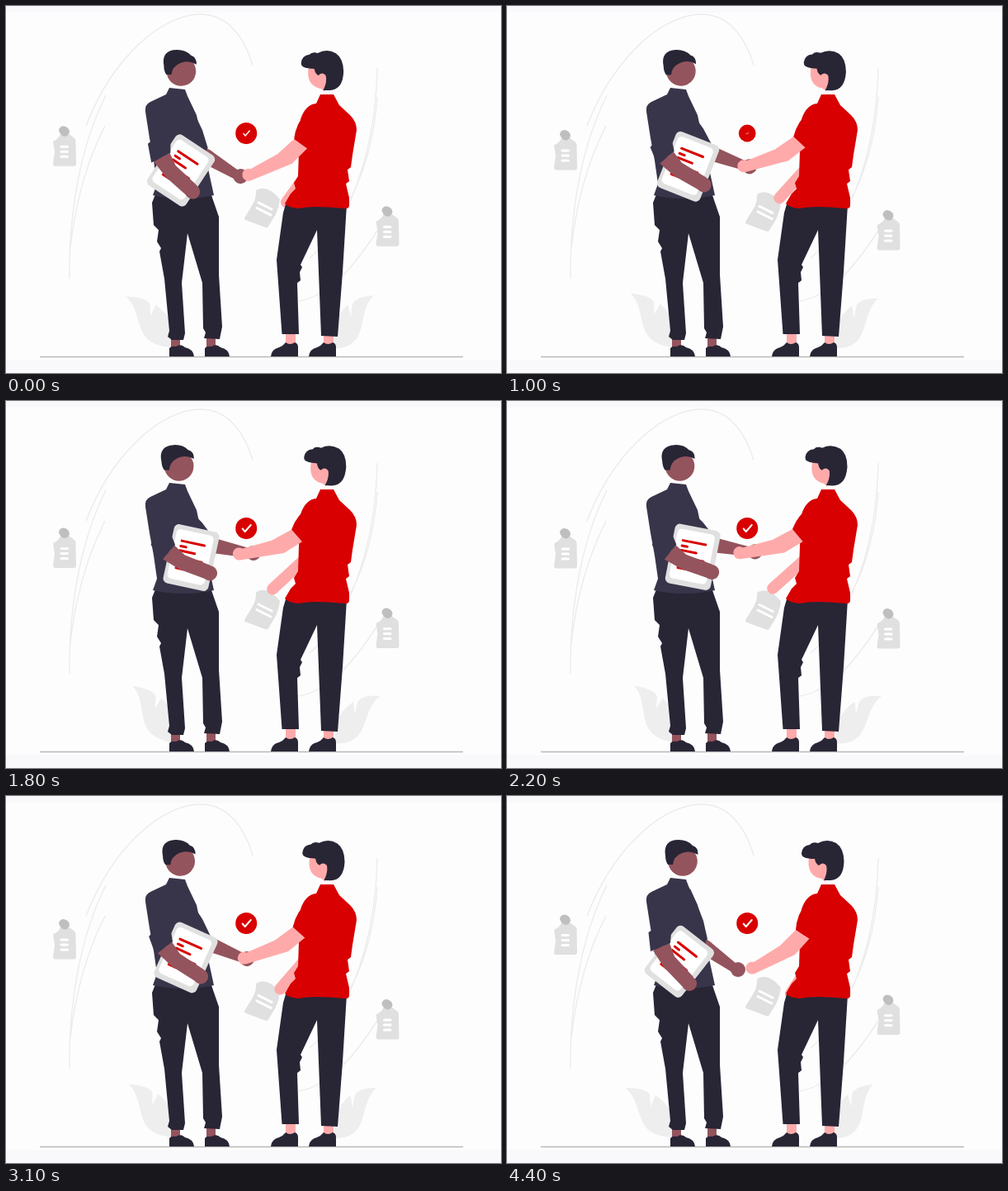
Recreate the animation shown at these times as an HTML page. Size 600 by 444 pixels, loop 4500 ms.

```html
<!DOCTYPE html>
<html lang="en">
<head>
<meta charset="utf-8">
<title>Handshake</title>
<style>
  html, body { margin: 0; width: 100%; height: 100%; overflow: hidden; background: #fdfdfd; }
  svg { display: block; width: 100%; height: 100%; }
  .arc { fill: none; stroke: #ececec; stroke-width: 1.4; }
  .leaf { fill: #eee; }
  .card { fill: #e0e0e0; }
  .pin { fill: #bfbfbf; }
  .dark { fill: #282535; }
  .shirt { fill: #38354a; }
  .red { fill: #d80000; }
  .pink { fill: #ffaaaa; }
  .brown { fill: #94545d; }
  .line { fill: none; stroke: #fff; stroke-width: 3; stroke-linecap: round; stroke-linejoin: round; }
  .notes { stroke: #d80000; }

  /* --p is the sway from 0 to 1 */
  .float { transform: translateY(calc(var(--p) * 10.5px)); }
  .turn { transform: rotate(calc(var(--p) * var(--deg))); }
  #badge { transform: scale(var(--badge)); }
  #tick { transform: scale(var(--tick)); stroke-width: 2; }
  #leafL { --deg: 9.5deg; transform-origin: 200px 414px; }
  #leafR { --deg: 9.5deg; transform-origin: 400px 414px; }
  #headL { --deg: -2.8deg; transform-origin: 209px 150px; }
  #headR { --deg: 3deg; transform-origin: 385px 155px; }
  #holdL { --deg: -27deg; transform-origin: 193px 160.5px; }
  #reachL { --deg: -25deg; transform-origin: 228px 150px; }
  #reachR { --deg: 17deg; transform-origin: 371px 145px; }
  #rearR { --deg: 15deg; transform-origin: 380px 150px; }
</style>
</head>
<body>
<svg viewBox="0 0 600 444">
  <defs>
    <g id="tag">
      <path class="card" d="M57 162Q65 158 66 153H76L83 158Q85 160 84.500 164L85 189Q85 192 82 192H60Q57 192 57 189L59 175Z"/>
      <path class="pin" d="M64 149Q64.500 143.500 70 143.500Q77 145 77 151Q75 156 71 156Q66 155 64 149Z"/>
      <path class="line" d="M67 168.500h7.500m-7.500 6h7.500m-7.500 6h7.500"/>
    </g>
    <path id="shoe" d="M198 424V414Q200 411 206 412Q212 408 217 413Q227 415 228 424Z"/>
    <path id="boot" d="M321 424Q322 415 331 413Q336 411 339 407Q344 411 350 407Q354 408 354 413V424Z"/>
  </defs>

  <path fill="#f9f9fb" d="M0 0h600v8H0zM0 428h600v16H0z"/>
  <path class="arc" d="M97 145C130 60 190 10 236 10C270 10 290 40 299 72M77 330C76 250 90 170 121 108M78 292C84 240 97 190 120 145M450 75C448 170 420 260 368 305M450 110C446 165 432 205 418 232M450 272C425 310 395 350 355 357"/>

  <path id="leafL" class="leaf turn" d="M143 353Q168 353 173 361L174 376L180 362Q195 372 203 390L200 413Q176 412 167 399C157 383 158 364 143 353Z"/>
  <path id="leafR" class="leaf turn" d="M444 349Q420 351 418 362L417 376L413 361Q402 370 396 390L398 414Q416 414 425 401C434 386 430 362 444 349Z"/>

  <g class="float"><use href="#tag"/><use href="#tag" x="391.500" y="97"/></g>
  <path stroke="#b9b9b9" stroke-width="1.500" d="M41 424.500H554"/>

  <g transform="translate(291.200 154)">
    <g id="badge">
      <circle class="red" r="13"/>
      <path id="tick" class="line" d="M-4.500 .5L-1.500 4L5.500 -4"/>
    </g>
  </g>

  <!-- left figure -->
  <g id="reachL" class="turn">
    <path class="brown" d="M236 170L246 176L277 202L276 215L238 192Z"/>
    <circle class="brown" cx="280" cy="210" r="9"/>
    <path class="shirt" d="M222 112L230 130L238 151L243 173L236 182L222 160Z"/>
  </g>
  <path class="brown" d="M200 402h11v12h-11zM243 402h11v12h-11z"/>
  <g class="dark">
    <use href="#shoe"/><use href="#shoe" x="43"/>
    <path d="M181 228L177 238L179 265L185 271L183 285L188 293L186 297L192 330L198 393L196 400L201 404H215L217 396L213 335L220 275L238 335L239 390L242 395L240 402L259 403L262 388L258 325V255L249 229Z"/>
  </g>
  <path class="shirt" d="M198 99L217 101L220 109L231 132L238 165L252 229Q215 237 178 229L183 215L179 187L174 160L169 128Q168 119 175 116L194 107Z"/>
  <g id="headL" class="turn">
    <circle class="brown" cx="213" cy="79" r="17.800"/>
    <path class="dark" d="M192 72C190 60 195 53 208 53Q219 53 225 60Q232 62 231.500 71Q222 65 212 69Q202 73 201 83H195Q192 79 192 72Z"/>
  </g>
  <g id="holdL" class="turn">
    <g transform="translate(208.500 200) rotate(38)">
      <rect class="card" x="-27.500" y="-36.500" width="56" height="73" rx="6"/>
      <rect fill="#fff" x="-23.500" y="-31" width="46" height="61" rx="5"/>
      <path class="line notes" d="M-15 -17.500H13M-15 -11H-8.500M-15 -5.500H3.500M-15 3H14M-15 16H-6"/>
    </g>
    <path class="brown" d="M177 187L197 178L203 194L226 219L215 233L190 207Z"/>
    <circle class="brown" cx="221" cy="227" r="9"/>
    <path class="shirt" d="M190 152L171.500 165L174 188L198 178L199 165Z"/>
  </g>

  <!-- right figure -->
  <g class="float">
    <path class="card" d="M306 220Q318 215 332 232Q331 241 327 250L318 265Q317 267 314 266L290 257Q288 256 290 253L298 240Q303 232 303 224Q303 220 306 220Z"/>
    <path class="line" d="M306 236L322 244M304 242.500L321 251"/>
  </g>
  <path id="rearR" class="line turn" style="stroke:#ffaaaa;stroke-width:14" d="M344 239L372 196"/>
  <path class="pink" d="M339 395h12v16h-12zM385 397h12v16h-12z"/>
  <g class="dark">
    <use href="#boot"/><use href="#boot" x="46"/>
    <path d="M339 240L336 250L328 307L334.500 397H355L353 335L357 332L356 322L359 316L357 313L377 271L382 399L402 400L408 322L413 240Z"/>
  </g>
  <path class="red" d="M381 107H397L404 120L417 132Q425 140 425 150L420 180L418 195L414 198L416 212L412 215L416 232V241Q416 245 412 245Q370 241 355 245Q342 244 338 239L345 227L351 221L349 214L354 206L355 175L357 137Q363 119 376 118Z"/>
  <g id="headR" class="turn">
    <path class="pink" d="M366 74Q363 94 377 99Q384 100 385 104L391 86L376 72Z"/>
    <path class="dark" d="M357 69Q358 60 367 59Q370 55 377 57Q388 51 399 57Q408 63 408.500 79Q408 101 392 102H384Q389 92 387 84Q383 79 378 84Q374 82 373 76Q364 76 360 74Q357 73 357 69Z"/>
  </g>
  <g id="reachR" class="turn">
    <path class="pink" d="M299 201L331 181L350 162L367 172L349 192L300 215Z"/>
    <circle class="pink" cx="297" cy="208" r="7.500"/>
    <path class="red" d="M381 117L365 126Q351 143 350 162L367 173L380 165L392 130Z"/>
  </g>
</svg>
<script>
  const LOOP = 4500, STEP = 100, HALF = 2200, POP = 600, REST = 0.17;
  const { style } = document.querySelector("svg");

  // Soft rise from the resting offset, then a quicker fall
  function sway(t) {
    const a = t / HALF * Math.PI / 2;
    return t < HALF
      ? REST + (1 - REST) * Math.sin(a) ** 1.5
      : Math.max(0, Math.sin(a)) ** 3;
  }

  // Shrinks to nothing around POP and grows back
  const pop = (t, wait, span) =>
    Math.min(1, Math.max(0, (Math.abs(t - POP) - wait) / span));

  function draw(t) {
    style.setProperty("--p", sway(t));
    style.setProperty("--badge", Math.max(0.05, pop(t, 0, 500)));
    style.setProperty("--tick", pop(t, 200, 550));
  }

  const start = performance.now();
  function frame() {
    const t = (performance.now() - start) % LOOP;
    draw(Math.floor(t / STEP) * STEP);
    requestAnimationFrame(frame);
  }
  frame();
</script>
</body>
</html>
```
